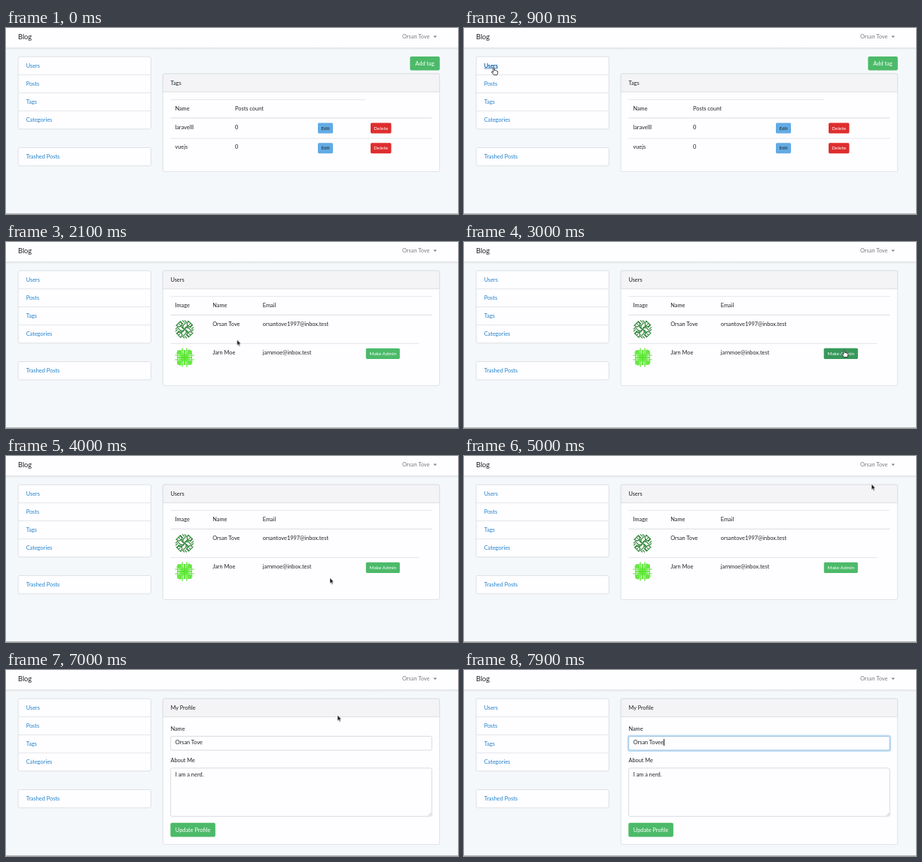
Write an HTML page that moves like this. It is 600 px wide and 248 px high and loops after 8 s.

```html
<!DOCTYPE html>
<html lang="en">
<head>
<meta charset="utf-8">
<title>Blog admin</title>
<style>
html, body { margin: 0; width: 100%; height: 100%; overflow: hidden; background: #f5f8fb; }
svg { display: block; width: 600px; height: 248px; }
text, .field { font: 7.4px Lato, "Open Sans", sans-serif; fill: #212529; color: #212529; white-space: pre; }
text.brand { font-size: 9.3px; }
text.user { fill: #7c7c80; }
text.link { fill: #2182cc; }
text.white { fill: #fff; }
text.small { font-size: 6.5px; }
text.mid { text-anchor: middle; }
.box { fill: #fefdff; stroke: #d9dbde; stroke-width: .8; }
.head { fill: #f4f3f5; stroke: #d9dbde; stroke-width: .8; }
.line { fill: none; stroke: #dee2e6; stroke-width: .8; }
.thick { stroke-width: 1.1; stroke: #d9dde1; }
.green { fill: #4cba69; }
.input { fill: #fefdff; stroke: #ced4da; stroke-width: .8; }
.field { line-height: 10px; }
.caret { display: inline-block; width: .7px; height: 9px; background: #222; vertical-align: -2px; }

/* 1.25% is one tenth of a second */
.show, #cursor { animation: 8s step-end infinite; }
#tags { animation-name: tags; }
#users { animation-name: users; }
#profile { animation-name: profile; }
#avatars { animation-name: avatars; }
#menu { animation-name: menu; }
#linkHover { animation-name: linkHover; }
#adminHover { animation-name: adminHover; }
#userHover { animation-name: userHover; }
#focus { animation-name: focus; }
.caret { animation-name: caret; }
#typed { animation-name: typed; }
#arrow { animation-name: arrow; }
#hand { animation-name: hand; }
#beam { animation-name: beam; }
#cursor { animation-name: move; }

@keyframes tags { 0% { opacity: 1 } 15%, 100% { opacity: 0 } }
@keyframes users { 0% { opacity: 0 } 15% { opacity: 1 } 81.25%, 100% { opacity: 0 } }
@keyframes profile { 0% { opacity: 0 } 81.25%, 100% { opacity: 1 } }
@keyframes avatars { 0% { opacity: 0 } 18.75%, 100% { opacity: 1 } }
@keyframes menu { 0% { opacity: 0 } 68.75% { opacity: 1 } 78.75%, 100% { opacity: 0 } }
@keyframes linkHover { 0% { opacity: 0 } 8.75% { opacity: 1 } 22.5%, 100% { opacity: 0 } }
@keyframes adminHover { 0% { opacity: 0 } 36.25% { opacity: 1 } 42.5%, 100% { opacity: 0 } }
@keyframes userHover { 0% { opacity: 0 } 66.25% { opacity: 1 } 71.25%, 100% { opacity: 0 } }
@keyframes focus { 0% { opacity: 0 } 95% { opacity: .6 } 96.25%, 100% { opacity: 1 } }
@keyframes caret { 0% { opacity: 0 } 95%, 100% { opacity: 1 } }
@keyframes typed { 0% { font-size: 0 } 98.75%, 100% { font-size: 7.4px } }
@keyframes arrow {
  0% { opacity: 0 } 1.25% { opacity: 1 } 8.75% { opacity: 0 } 22.5% { opacity: 1 }
  36.25% { opacity: 0 } 42.5% { opacity: 1 } 66.25% { opacity: 0 } 78.75% { opacity: 1 }
  91.25%, 100% { opacity: 0 }
}
@keyframes hand {
  0% { opacity: 0 } 8.75% { opacity: 1 } 22.5% { opacity: 0 } 36.25% { opacity: 1 }
  42.5% { opacity: 0 } 66.25% { opacity: 1 } 78.75%, 100% { opacity: 0 }
}
@keyframes beam { 0% { opacity: 0 } 91.25% { opacity: 1 } 98.75%, 100% { opacity: 0 } }
@keyframes move {
  0% { transform: translate(330px, 150px); animation-timing-function: steps(7) }
  8.75% { transform: translate(40px, 53px) }
  21.25% { transform: translate(40px, 53px); animation-timing-function: steps(6) }
  28.75% { transform: translate(440px, 169px) }
  30% { transform: translate(440px, 169px); animation-timing-function: steps(4) }
  35% { transform: translate(492px, 174px) }
  36.25% { transform: translate(505px, 144px) }
  41.25% { transform: translate(505px, 144px); animation-timing-function: steps(7) }
  50% { transform: translate(430px, 162.5px) }
  52.5% { transform: translate(430px, 162.5px); animation-timing-function: steps(8) }
  62.5% { transform: translate(541px, 37.5px) }
  63.75% { transform: translate(541px, 37.5px); animation-timing-function: steps(2) }
  66.25% { transform: translate(546px, 10px) }
  70% { transform: translate(546px, 10px); animation-timing-function: steps(5) }
  76.25% { transform: translate(527.5px, 35.5px) }
  85% { transform: translate(527.5px, 35.5px); animation-timing-function: steps(5) }
  91.25%, 100% { transform: translate(309px, 97.5px) }
}
</style>
</head>
<body>
<svg viewBox="0 0 600 248" xmlns="http://www.w3.org/2000/svg">
  <defs>
    <linearGradient id="shade" x2="0" y2="1">
      <stop stop-color="#dfe2e5"/><stop offset="1" stop-color="#f5f8fb"/>
    </linearGradient>
    <clipPath id="round"><circle r="13"/></clipPath>
    <path id="weave" d="M-11-5l5-5 3 3-4 4zM-6-11l4 4M-9-2l4 4M-3-12l3 3M-12 0l3-3M-5-4l3-1v4zM-3-3l3 3M-8-8l2 2" fill="none" stroke="#2f8537" stroke-width="1.15"/>
    <path id="plaid" d="M-13-9H0M-11-6H0M-13-3H0M-10 0H0M-9-12V0M-6-10V0M-3-13V0M0-10V0M-8-8h3v3h-3zM-4-4h3v3h-3z" fill="none" stroke="#58e52f" stroke-width="1.2"/>
  </defs>

  <rect width="600" height="248" fill="#f5f8fb"/>
  <rect y="26" width="600" height="3.5" fill="url(#shade)"/>
  <rect width="600" height="26" fill="#fefdff"/>
  <rect y="247" width="600" height="1" fill="#b4b6b8"/>
  <text class="brand" x="16" y="15.3">Blog</text>
  <text class="user" x="526" y="14.4">Orsan Tove</text>
  <path d="M567.3 10.6h4.6l-2.3 2.4z" fill="#7c7c80"/>
  <g id="userHover" class="show">
    <text x="526" y="14.4" style="fill:#4c4c50">Orsan Tove</text>
    <path d="M567.3 10.6h4.6l-2.3 2.4z" fill="#4c4c50"/>
  </g>

  <rect class="box" x="16.2" y="38.2" width="176.2" height="96.6" rx="2"/>
  <path class="line" d="M16 62.4H192.4M16 86.5H192.4M16 110.6H192.4"/>
  <rect class="box" x="16.2" y="159.5" width="176.2" height="24.3" rx="2"/>
  <text class="link" x="26.7" y="52.6">Users</text>
  <text class="link" x="26.7" y="76.7">Posts</text>
  <text class="link" x="26.7" y="100.9">Tags</text>
  <text class="link" x="26.7" y="125">Categories</text>
  <text class="link" x="26.7" y="174">Trashed Posts</text>
  <text id="linkHover" class="show" x="26.7" y="52.6" style="fill:#1d68a7;text-decoration:underline">Users</text>

  <g id="tags" class="show">
    <rect class="green" x="536.3" y="38" width="39.5" height="18.5" rx="2"/>
    <text class="white mid" x="556" y="49.7">Add tag</text>
    <rect class="box" x="208.2" y="61" width="367.4" height="130.6" rx="2"/>
    <path class="head" d="M208.2 85.2V63q0-2 2-2H573.6q2 0 2 2V85.2z"/>
    <text x="218.4" y="75.6">Tags</text>
    <path class="line" d="M218.4 95.6H478M218.4 147.2H565.2"/>
    <path class="line thick" d="M218.4 120H565.2"/>
    <text x="224.4" y="110">Name</text>
    <text x="304" y="110">Posts count</text>
    <text x="224.4" y="134.6">laravelll</text>
    <text x="304" y="134.6">0</text>
    <text x="224.4" y="161.3">vuejs</text>
    <text x="304" y="161.3">0</text>
    <g id="actions">
      <rect x="414" y="126.5" width="20" height="14" rx="1.6" fill="#62abe4"/>
      <text class="small mid" x="424" y="135.8">Edit</text>
      <rect x="484" y="126.5" width="27.4" height="14" rx="1.6" fill="#df2d2e"/>
      <text class="small white mid" x="497.7" y="135.8">Delete</text>
    </g>
    <use href="#actions" y="26.7"/>
  </g>

  <g id="users" class="show">
    <rect class="box" x="208.2" y="38.2" width="367.4" height="153.2" rx="2"/>
    <path class="head" d="M208.2 62.4V40.2q0-2 2-2H573.6q2 0 2 2V62.4z"/>
    <text x="218.4" y="52.6">Users</text>
    <path class="line" d="M218.4 72.6H565.2M218.4 135.4H548.5"/>
    <path class="line thick" d="M218.4 97.2H565.2"/>
    <text x="224.4" y="87.3">Image</text>
    <text x="274.2" y="87.3">Name</text>
    <text x="340.8" y="87.3">Email</text>
    <text x="274.2" y="112">Orsan Tove</text>
    <text x="340.8" y="112">orsantove1997@inbox.test</text>
    <text x="274.2" y="149.8">Jarn Moe</text>
    <text x="340.8" y="149.8">jarnmoe@inbox.test</text>
    <rect class="green" x="477.8" y="141.7" width="45" height="14.2" rx="1.6"/>
    <rect id="adminHover" class="show" x="477.8" y="141.7" width="45" height="14.2" rx="1.6" fill="#37985a"/>
    <text class="small white mid" x="500.3" y="151.1">Make Admin</text>
    <g id="avatars" class="show">
      <g transform="translate(237 116.3)"><g clip-path="url(#round)">
        <use href="#weave"/><use href="#weave" transform="rotate(90)"/>
        <use href="#weave" transform="rotate(180)"/><use href="#weave" transform="rotate(270)"/>
      </g></g>
      <g transform="translate(237 154)"><g clip-path="url(#round)">
        <use href="#plaid"/><use href="#plaid" transform="rotate(90)"/>
        <use href="#plaid" transform="rotate(180)"/><use href="#plaid" transform="rotate(270)"/>
      </g></g>
    </g>
  </g>

  <g id="profile" class="show">
    <rect class="box" x="208.2" y="38.2" width="367.4" height="194.4" rx="2"/>
    <path class="head" d="M208.2 62.4V40.2q0-2 2-2H573.6q2 0 2 2V62.4z"/>
    <text x="218.4" y="52.6">My Profile</text>
    <text x="218.4" y="80.6">Name</text>
    <rect class="input" x="218.6" y="88.4" width="346.6" height="18.6" rx="2"/>
    <g id="focus" class="show" fill="none">
      <rect x="217.6" y="87.4" width="348.6" height="20.6" rx="2.6" stroke="#c6e0f5" stroke-width="1.8"/>
      <rect x="218.6" y="88.4" width="346.6" height="18.6" rx="2" stroke="#8fc3ea" stroke-width=".8"/>
    </g>
    <foreignObject x="224.7" y="92.3" width="120" height="12">
      <div class="field">Orsan Tove<span id="typed" class="show">e</span><span class="caret show"></span></div>
    </foreignObject>
    <text x="218.4" y="123.1">About Me</text>
    <rect class="input" x="218.6" y="130.8" width="346.6" height="64.4" rx="2"/>
    <path d="M560.8 194.2l3.6-3.6M562.8 194.2l1.6-1.6" stroke="#8a8a8c" stroke-width=".5"/>
    <text x="224.7" y="142.4">I am a nerd.</text>
    <rect class="green" x="218.3" y="203.8" width="59.6" height="18.6" rx="2"/>
    <text class="white mid" x="248.1" y="215.6">Update Profile</text>
  </g>

  <g id="menu" class="show">
    <rect class="box" x="495.2" y="21.4" width="80.4" height="40" rx="2"/>
    <rect x="495.6" y="25.5" width="79.6" height="16" fill="#f3f5f8"/>
    <text x="507.5" y="36">My Profile</text>
    <text x="507.5" y="52">Logout</text>
  </g>

  <g id="cursor">
    <path id="arrow" class="show" d="M0 0V7.4L1.7 5.9 2.9 8.8 4.1 8.3 2.9 5.5H5.2z" fill="#111" stroke="#fff" stroke-width=".5"/>
    <path id="hand" class="show" d="M-1.2 .8Q-.4-.4.4.8V3.6Q1.4 3 2 3.9 3 3.4 3.5 4.3 4.6 4 4.8 5.2V7L3.8 9.6H-.4L-3.2 6.2Q-3.6 4.8-2.3 5.1L-1.2 6.2z" fill="#fff" stroke="#111" stroke-width=".8"/>
    <path id="beam" class="show" d="M-1.6-4.4Q0-4.4 0-3.4 0-4.4 1.6-4.4M0-3.4V3.4M-1.6 4.4Q0 4.4 0 3.4 0 4.4 1.6 4.4" fill="none" stroke="#222" stroke-width=".7"/>
  </g>
</svg>
</body>
</html>
```
